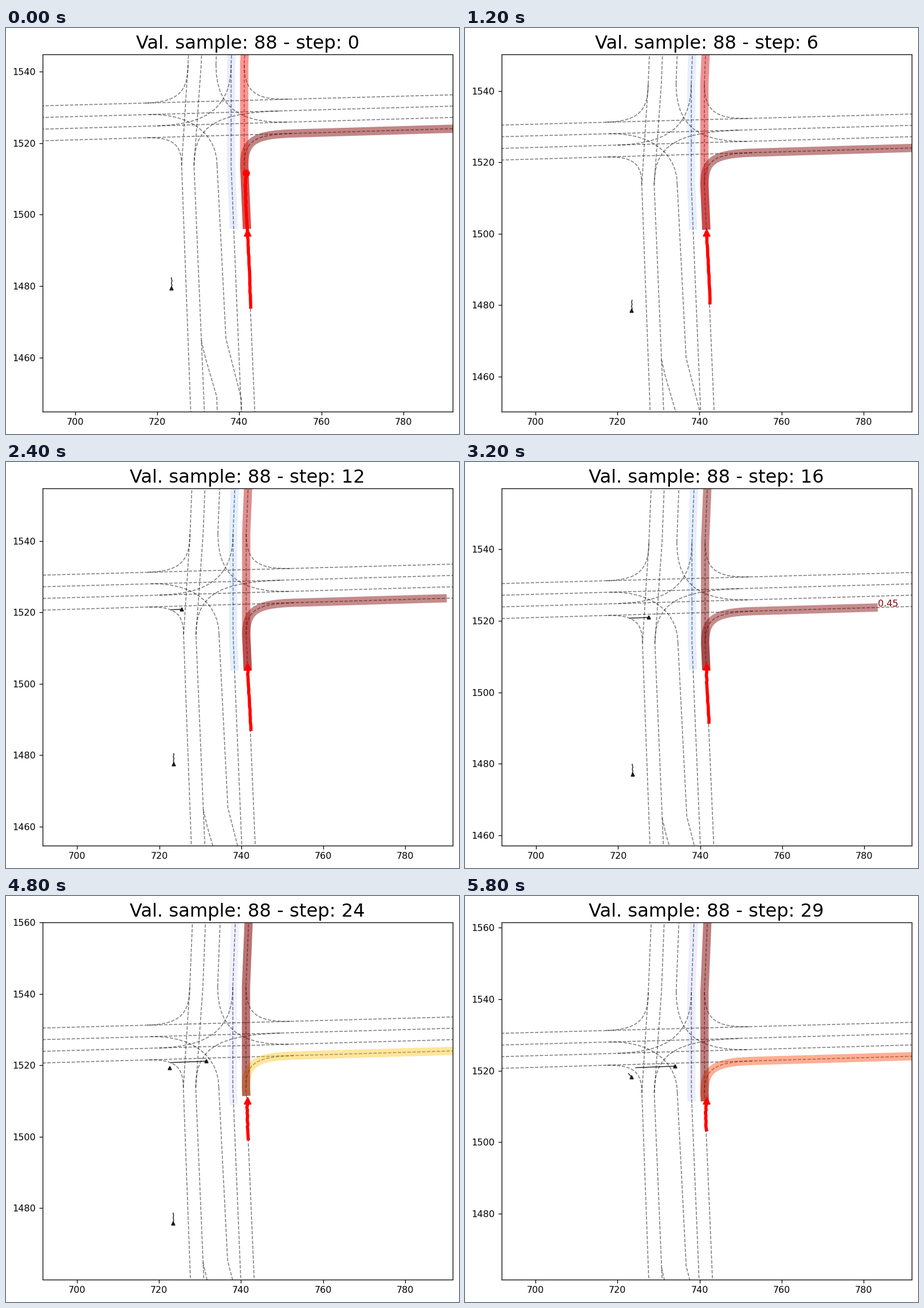
Animation of 791x708 px, one loop 6 s. Source, as a matplotlib script:

```python
import numpy as np
import matplotlib.pyplot as plt
from matplotlib.animation import FuncAnimation
from matplotlib.ticker import MultipleLocator

W, H, DPI = 791, 708, 115.5
LEFT, RIGHT, TOP, BOTTOM = 63.6, 779.7, 45.7, 668.6
STEPS, HISTORY, VIEW = 30, 19, 50
SOUTH, NORTH = 1513.8, 1542.0          # where the junction begins and ends
NODE0, NODE_GAP = 1496.0, 2.57         # spacing of the lane nodes

jet = plt.get_cmap("jet")
rng = np.random.default_rng(8)


# Road map

def cross_y(i, x):
    """Height of the i-th west-east lane, counted from the north."""
    return 1530.45 - 3.265 * i + (0.0308 + 0.001 * i) * (x - 692)


def street(*xs):
    """South-north lane given by its x at four heights."""
    return np.column_stack([xs, [1440, SOUTH, NORTH, 1563]])


def turn(x, y, exit_x, i, pull=0.75):
    """Bezier from a street point (x, y) into cross lane i at exit_x."""
    start = np.array([x, y])
    end = np.array([exit_x, cross_y(i, exit_x)])
    corner = np.array([x, cross_y(i, x)])
    a, b = start + pull * (corner - start), end + pull * (corner - end)
    t = np.linspace(0, 1, 13)[:, None]
    return ((1 - t) ** 3 * start + 3 * t * (1 - t) ** 2 * a
            + 3 * t ** 2 * (1 - t) * b + t ** 3 * end)


middle = street(740.65, 738.0, 738.0, 738.7)
ahead_lane = street(743.95, 741.2, 741.2, 741.95)
right_turn = turn(741.2, SOUTH, 753, 3, 0.8)
lanes = [
    street(728.3, 725.93, 727.5, 728.25),
    street(731.65, 728.95, 730.7, 731.42),
    middle,
    ahead_lane,
    right_turn,
    turn(725.93, SOUTH, 717, 3),
    turn(728.95, SOUTH, 750, 1),
    turn(734.57, SOUTH, 718, 1, 0.6),
    turn(727.5, NORTH, 717, 0),
    turn(734.3, NORTH, 752, 2, 0.7),
    turn(738.0, NORTH, 720, 2, 0.7),
    turn(741.2, NORTH, 752, 0),
    np.array([(734.3, NORTH), (735, 1563)]),
    np.array([(734.57, SOUTH), (736.73, 1465.3), (740.5, 1448.4), (740.6, 1440)]),
    np.array([(730.73, 1464.8), (731.7, 1460), (734.5, 1449), (734.7, 1440)]),
]
ends = np.array([688, 796])
lanes += [np.column_stack([ends, cross_y(i, ends)]) for i in range(4)]


# Moving agents: one row of x, y per step

def track(first, last, x, y, jitter=0.0):
    s = np.arange(first, last + 1)
    pts = np.column_stack([x(s) + rng.normal(0, jitter, len(s)), y(s)])
    return dict(zip(s.tolist(), pts))


EGO_T = [-HISTORY, 0, 8, 12, 16, 24, 29]
EGO_X = [742.85, 742.0, 741.62, 741.6, 741.47, 741.62, 741.72]
EGO_Y = [1474.1, 1494.9, 1502.07, 1504.77, 1507.13, 1510.05, 1511.55]

ego = track(-HISTORY, STEPS - 1,
            lambda s: np.interp(s, EGO_T, EGO_X),
            lambda s: np.interp(s, EGO_T, EGO_Y), 0.04)
others = [
    track(-HISTORY, 26, lambda s: 723.5 + 0.06 * np.sin(0.8 * s),
          lambda s: 1479.4 - 0.154 * s, 0.02),
    track(7, 29, lambda s: 722.9 + 0.51 * (s - 7), lambda s: 1520.75 + 0.023 * (s - 7)),
    track(24, 29, lambda s: 722.67 + 0.166 * (s - 24), lambda s: 1519.2 - 0.22 * (s - 24)),
]


def history(agent, step):
    return np.array([agent[s] for s in range(step - HISTORY, step + 1) if s in agent])


# Predicted routes

def probabilities(step):
    t = [0, 12, 16, 24, 29]
    right = np.interp(step, t, [0.48, 0.455, 0.45, 0.39, 0.42])
    ahead = np.interp(step, t, [0.43, 0.435, 0.45, 0.55, 0.50])
    return right, ahead, 1 - right - ahead


def nearest_node(y, shift=0.0):
    return NODE0 + NODE_GAP * round((y - NODE0) / NODE_GAP + shift)


def from_height(path, y0):
    x0 = np.interp(y0, path[:, 1], path[:, 0])
    return np.vstack([[x0, y0], path[path[:, 1] > y0]])


fig = plt.figure(figsize=((W + 1e-6) / DPI, (H + 1e-6) / DPI), dpi=DPI, facecolor="white")
ax = fig.add_axes([LEFT / W, 1 - BOTTOM / H, (RIGHT - LEFT) / W, (BOTTOM - TOP) / H])


def line(path, color, **style):
    ax.plot(*path.T, color=color, **style)


def draw(step):
    ax.clear()
    cx, cy = ego[step]

    for lane in lanes:
        line(lane, "black", ls="--", alpha=0.5, lw=1)

    probs = probabilities(step)
    colors = [jet(p / max(probs)) for p in probs]
    start = nearest_node(cy, 0.05)
    end = min(783.3 + 1.7 * abs(step - 16), 795)
    end_y = cross_y(3, end)
    routes = [
        from_height(np.vstack([ahead_lane[:1], right_turn, [end, end_y]]), start),
        from_height(ahead_lane, start),
        from_height(middle, nearest_node(cy)),
    ]
    for route, prob, color in zip(routes, probs, colors):
        line(route, color, alpha=prob, lw=9, solid_capstyle="butt")
    if end + 5 < cx + VIEW:
        ax.text(end, end_y + 0.35, f"{probs[0]:.2f}", color=colors[0], fontsize=10)

    for agent in others:
        if step in agent:
            line(history(agent, step), "black", alpha=0.8, lw=1)
            line(agent[step], "black", alpha=0.8, marker="^", ms=4)

    line(history(ego, step), "red", lw=3.5)
    if step == 0:
        future = np.array([ego[s] for s in range(STEPS)])
        line(future, "red", lw=3.5)
        line(future[-1], "red", marker="o", ms=7)
    line(ego[step], "red", marker="^", ms=7)

    ax.set_xlim(cx - VIEW, cx + VIEW)
    ax.set_ylim(cy - VIEW, cy + VIEW)
    for axis in (ax.xaxis, ax.yaxis):
        axis.set_major_locator(MultipleLocator(20))
    ax.set_title(f"Val. sample: 88 - step: {step}", fontsize=20)
    return []


anim = FuncAnimation(fig, draw, frames=STEPS, interval=200, init_func=lambda: [],
                     repeat=True, repeat_delay=0)
plt.show()
```
